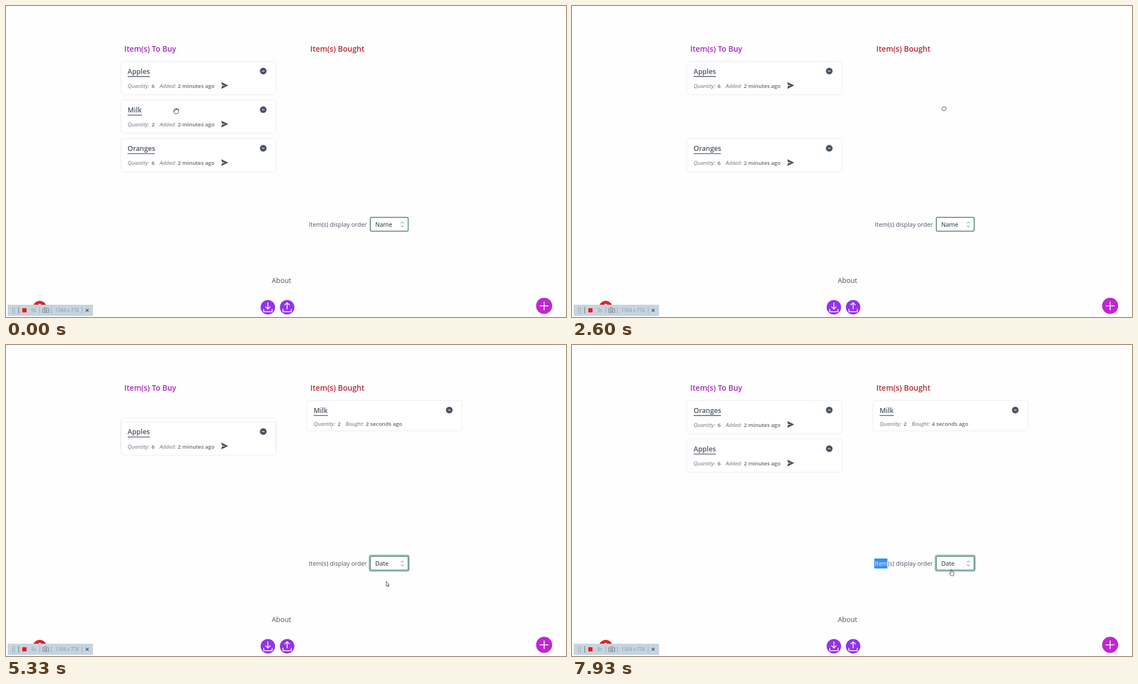
Write an HTML page that moves like this. It is 1004x558 px and loops after 8 s.

```html
<!DOCTYPE html>
<html lang="en">
<head>
<meta charset="utf-8">
<title>Shopping list</title>
<style>
  html, body { margin: 0; width: 100%; height: 100%; overflow: hidden; background: #fefefe; }
  svg { display: block; width: 1004px; height: 558px; }
  text { font-family: "Open Sans", "Noto Sans", sans-serif; fill: #4b5563; white-space: pre; }
  .heading { font-size: 13.7px; font-weight: 600; }
  .name { font-size: 12.3px; font-weight: 600; }
  .key { font-size: 9.6px; font-style: italic; fill: #6b7280; }
  .value { font-size: 9.7px; font-weight: 600; fill: #606873; }
  .label { font-size: 10.9px; }
  .tool { font-size: 8.3px; fill: #8a96a1; }
  .card { fill: #fff; filter: drop-shadow(0 .8px 1px rgba(0, 0, 0, .17)); }
  .line { fill: none; stroke: #fff; stroke-width: 1.5; stroke-linecap: round; stroke-linejoin: round; }
  .cursor { fill: #fff; stroke: #444; stroke-width: .9; stroke-linejoin: round; }
</style>
</head>
<body>
<svg viewBox="0 0 1004 558">
  <rect width="1004" height="558" fill="#fefefe"/>
  <text class="heading" x="212" y="82" style="fill:#a32abd">Item(s) To Buy</text>
  <rect id="zone" x="519.3" y="59.8" width="324" height="310" rx="2" fill="none" stroke="#4669a5" stroke-width="1.5" stroke-dasharray="3.7 2.2"/>
  <text class="heading" x="545.5" y="82" style="fill:#b92b35">Item(s) Bought</text>

  <g id="cards"></g>

  <rect id="selection" x="542" y="383" width="23.5" height="18" fill="#3b8ff0"/>
  <text class="label" x="543" y="396"><tspan id="word">Item</tspan>(s) display order</text>
  <rect id="ring" x="651.2" y="377.2" width="71.6" height="28.8" rx="3.5" fill="#fff" stroke="#5fa387" stroke-width="1.2"/>
  <rect x="653.2" y="379.2" width="67.8" height="24.8" rx="2" fill="#fff" stroke="#4b8069" stroke-width="1.5"/>
  <text id="choice" class="label" x="662" y="396" style="fill:#1f2937"></text>
  <path d="M708 390l2.6-2.7 2.6 2.7M708 394l2.6 2.7 2.6-2.7" fill="none" stroke="#6b7280"/>

  <text x="476.5" y="497" font-size="12.4">About</text>

  <circle cx="469.5" cy="540.5" r="13" fill="#9333ea"/>
  <path class="line" d="M469.5 532.5v11M465.5 539.8l4 4 4-4M462 544v4.5h15v-4.5"/>
  <circle cx="504" cy="540.5" r="13" fill="#9333ea"/>
  <path class="line" d="M504 543.5v-11M500 536.3l4-4 4 4M496.5 544v4.5h15v-4.5"/>
  <circle cx="964.8" cy="538" r="14.4" fill="#c026d3"/>
  <path class="line" d="M957.5 538h14.6M964.8 530.7v14.6"/>

  <circle cx="60.5" cy="541" r="12" fill="#dc2626"/>
  <path class="line" d="M58 537q2.5-4 5 0"/>
  <rect x="3" y="536" width="153" height="20" fill="#c6d4df"/>
  <path d="M11.8 541v11M15.2 541v11" stroke="#8795a2" stroke-width="1.4" stroke-dasharray="1.4 1.6"/>
  <path d="M22.7 540v12" stroke="#66727e"/>
  <path d="M60.5 540v12M81.5 540v12M136.5 540v12" stroke="#9eabb7"/>
  <rect x="28.7" y="541.7" width="8.6" height="8.6" fill="#d81f26" stroke="#f2d9dc"/>
  <text id="timer" class="tool" x="45.5" y="549"></text>
  <path d="M66 543h2.5l1.2-1.7h3l1.2 1.7h2.6v7H66z" fill="none" stroke="#7b8792" stroke-width="1.2"/>
  <circle cx="71.2" cy="546.3" r="2" fill="none" stroke="#7b8792" stroke-width="1.2"/>
  <text class="tool" x="88.5" y="549">1394 x 774</text>
  <path d="M143 543.5l5 5M148 543.5l-5 5" stroke="#44566b" stroke-width="1.3"/>

  <g id="cursor">
    <path class="cursor" data-kind="open" d="M-2.5 5L-5 1q-.5-1.6 1-1.2L-2.6.9-3.2-3q.8-1.3 1.6 0L-1-1.3V-4q.9-1.2 1.7 0v2.5L1.4-4q1-.9 1.6.3L2.7-1 3.5-2.5q1.2-.7 1.3.6L4 2.5 2.7 5z"/>
    <path class="cursor" data-kind="closed" d="M-2.3 3.8L-3.8 1-3.5-1.3-2.3-1.8Q-1.8-3.7-.3-3 .7-4 1.7-2.8 3.5-3.2 3.8-1.2L3.6 1.5 2.3 3.8z"/>
    <path class="cursor" data-kind="pointer" d="M-1.5 6L-4 2q-.2-1.4 1.2-.7l.9.8V-5q.8-1.4 1.7 0v3.6l3.3.7q1 .3.9 1.4L3.3 4 2.8 6z"/>
    <path class="cursor" data-kind="arrow" d="M-2.3-5V3.7L-.3 2 1 5 2.4 4.4 1.1 1.5H3.2z"/>
  </g>
</svg>
<script>
const LOOP = 8000, STEP = 130;
const byId = id => document.getElementById(id);
const show = (el, on) => el.setAttribute("visibility", on ? "visible" : "hidden");
const move = (el, x, y) => el.setAttribute("transform", `translate(${x} ${y})`);

// Each card is laid out from its own top-left corner.
function addCard(name, width, quantity, verb, age) {
  const bought = verb === "Bought:";
  const base = bought ? 44.5 : 47;
  const card = document.createElementNS("http://www.w3.org/2000/svg", "g");
  card.innerHTML = `
    <rect class="card" width="277" height="${bought ? 53.5 : 58.5}" rx="5"/>
    <text class="name" x="11.5" y="21.7">${name}</text>
    <path d="M11.5 26.5h${width}" stroke="#4b5563" stroke-width="1.3"/>
    <text class="key" x="11.5" y="${base}">Quantity:</text>
    <text class="value" x="54.5" y="${base}">${quantity}</text>
    <text class="key" x="69" y="${base}">${verb}</text>
    <text class="value age" x="${bought ? 105 : 101.5}" y="${base}">${age}</text>
    <circle cx="254.7" cy="16.8" r="6" fill="#4b5563"/>
    <path d="M252.5 16.8h4.4" stroke="#fff" stroke-width="1.2"/>
    ${bought ? "" : '<path d="M179.5 36.5L192 42.6 179.5 48.7 180.6 43.5 186.5 42.6 180.6 41.7z" fill="#4b5563"/>'}`;
  byId("cards").append(card);
  return card;
}

const AGO = "2 minutes ago";
const oranges = addCard("Oranges", 49, 6, "Added:", AGO);
const apples = addCard("Apples", 40, 6, "Added:", AGO);
const milkBought = addCard("Milk", 25.7, 2, "Bought:", "");
const milk = addCard("Milk", 25.7, 2, "Added:", AGO);
const boughtAge = milkBought.querySelector(".age");

// Linear interpolation through [time, ...values] keys.
function track(keys, t) {
  const next = keys.findIndex(key => key[0] > t);
  if (next < 0) return keys.at(-1).slice(1);
  const a = keys[next - 1], b = keys[next];
  const p = (t - a[0]) / (b[0] - a[0]);
  return a.slice(1).map((v, i) => v + (b[i + 1] - v) * p);
}

const LEFT = 206.5, TOP = 100, SLOT = 69.2;
const START = [305, 188];
const cursorPath = [
  [0, ...START], [390, ...START], [780, 325, 187], [1040, 400, 182], [1300, 577, 179],
  [1560, 577, 179], [2340, 667, 184], [2600, 667, 184], [3380, 686, 394], [3640, 684, 403],
  [4290, 684, 403], [4420, 684, 408], [4680, 684, 408], [5070, 684, 429], [5330, 684, 429],
  [5720, 558, 394], [6110, 558, 394], [6370, 690, 380], [6890, 683, 402], [7930, 681, 408]
];
const orangesPath = [
  [0, 2], [1040, 2], [1170, 1.7], [1300, 1.165], [1560, 1.165], [1690, 1], [2599, 1],
  [2600, 2], [2730, 2], [2860, 1.4], [2990, 1], [5200, 1], [5330, .45], [5460, .05], [5590, 0]
];
const applesPath = [[0, 0], [5200, 0], [5330, .557], [5460, .95], [5590, 1]];
const kinds = [
  [0, "open"], [520, "closed"], [2730, "arrow"], [3380, "pointer"],
  [4420, "arrow"], [6500, "pointer"]
];

function render(time) {
  const t = Math.floor(time / STEP) * STEP;
  const [x, y] = track(cursorPath, t);
  const dragging = t >= 520 && t < 2600;
  const sorted = t >= 5200;

  move(oranges, LEFT, TOP + SLOT * track(orangesPath, t)[0]);
  move(apples, LEFT, TOP + SLOT * track(applesPath, t)[0]);
  move(milk, LEFT + x - START[0], TOP + SLOT + y - START[1]);
  move(milkBought, sorted ? 540 : 541, TOP);
  show(milk, t < 2600);
  show(milkBought, t >= 2730);
  show(byId("zone"), dragging);

  const seconds = Math.max(0, Math.floor((t - 3120) / 1000));
  boughtAge.textContent = `${seconds} second${seconds === 1 ? "" : "s"} ago`;
  byId("timer").textContent = `${Math.floor((t - 1040) / 1000) + 2}s`;

  const selected = t >= 5850;
  show(byId("selection"), selected);
  byId("word").style.fill = selected ? "#fff" : "";
  show(byId("ring"), (t >= 4160 && t < 5720) || t >= 7020);
  byId("choice").textContent = sorted ? "Date" : "Name";

  const kind = kinds.findLast(([start]) => start <= t)[1];
  for (const shape of byId("cursor").children) show(shape, shape.dataset.kind === kind);
  move(byId("cursor"), x, y);
}

const began = performance.now();
function frame() {
  render((performance.now() - began) % LOOP);
  requestAnimationFrame(frame);
}
frame();
</script>
</body>
</html>
```
